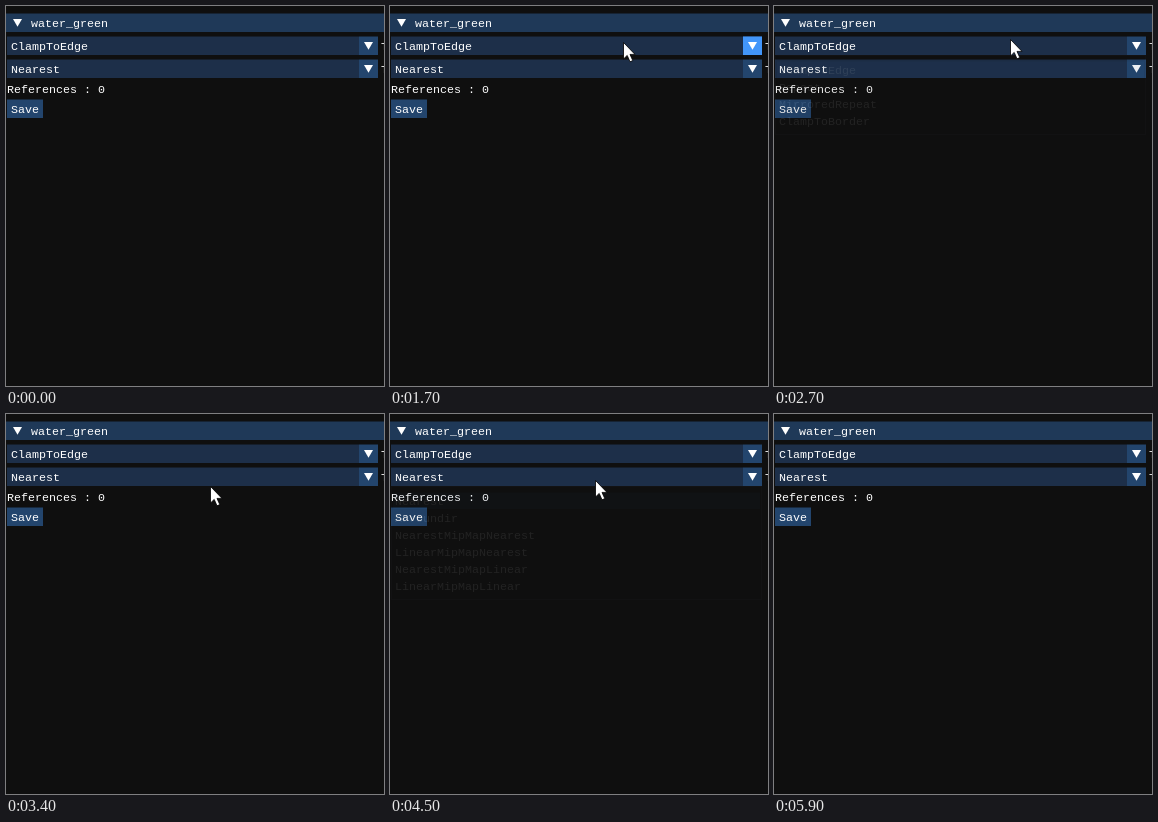
Write an HTML page that moves like this. It is 378 px wide and 380 px high and loops after 6.7 s.

```html
<!DOCTYPE html>
<html lang="en">
<head>
<meta charset="utf-8">
<title>Texture settings panel</title>
<style>
  html, body { margin: 0; width: 100%; height: 100%; overflow: hidden; background: #0f0f0f; }
  svg { display: block; width: 378px; height: 380px; }
  text { font: 11.667px "Liberation Mono", monospace; fill: #fff; white-space: pre; }
  .header { fill: #1f3958; }
  .field { fill: #1d2f49; }
  .button { fill: #23456d; }
  .glyph { fill: #fff; }
  .popup { fill: #0f0f0f; stroke: #3c3c40; }

  .lit, .menu, #cursor { animation: 6700ms step-end infinite; }
  .lit { fill: #4296fa; opacity: 0; }
  #wrapLit { animation-name: wrap-lit; }
  #filterLit { animation-name: filter-lit; }
  #saveLit { animation-name: save-lit; }
  #wrapMenu { animation-name: wrap-menu; }
  #filterMenu { animation-name: filter-menu; }
  #cursor { animation-name: cursor; }

  @keyframes wrap-lit {
    0%, 40.29%, 100% { opacity: 0; }
    25.37% { opacity: 1; }
  }
  @keyframes filter-lit {
    0%, 67.16%, 100% { opacity: 0; }
    52.23% { opacity: 1; }
  }
  @keyframes save-lit {
    0%, 79.1%, 100% { opacity: 0; }
    73.13% { opacity: 1; }
  }
  @keyframes wrap-menu {
    0%, 43.28%, 100% { opacity: 0; }
    26.86% { opacity: .9; }
    28.35% { opacity: .96; }
    32.83% { opacity: 1; }
    40.29% { opacity: .08; }
    41.79% { opacity: .04; }
  }
  @keyframes filter-menu {
    0%, 73.13%, 100% { opacity: 0; }
    53.73% { opacity: .9; }
    55.22% { opacity: .98; }
    56.71% { opacity: 1; }
    67.16% { opacity: .08; }
    70.14% { opacity: .04; }
  }
  @keyframes cursor {
    0%, 83.58%, 100% { transform: translate(-40px, 0); }
    11.94% { transform: translate(221px, 90px); }
    13.43% { transform: translate(222px, 48px); }
    25.37% { transform: translate(233px, 36px); }
    26.86% { transform: translate(236px, 33px); }
    41.79% { transform: translate(232px, 40px); }
    43.28% { transform: translate(225px, 50px); }
    46.26% { transform: translate(217px, 60px); }
    47.76% { transform: translate(208px, 70px); }
    49.25% { transform: translate(204px, 72px); }
    52.23% { transform: translate(205px, 68px); }
    56.71% { transform: translate(205px, 66px); }
    68.65% { transform: translate(165px, 76px); }
    70.14% { transform: translate(105px, 90px); }
    71.64% { transform: translate(52px, 100px); }
    73.13% { transform: translate(24px, 104px); }
    77.61% { transform: translate(22px, 107px); }
    79.1% { transform: translate(18px, 116px); }
    80.59% { transform: translate(10px, 126px); }
    82.08% { transform: translate(1px, 136px); }
  }
</style>
</head>
<body>
<svg viewBox="0 0 378 380">
  <defs>
    <path id="down" class="glyph" d="M-4.5-3.9H4.5L0 3.9Z"/>
    <g id="combo">
      <rect class="field" width="352" height="18.5"/>
      <rect class="button" x="352" width="19" height="18.5"/>
    </g>
  </defs>

  <rect class="header" y="7.5" width="378" height="18.5"/>
  <use href="#down" x="11.5" y="16.8"/>
  <text x="25" y="21">water_green</text>

  <use href="#combo" x="1" y="30.5"/>
  <rect id="wrapLit" class="lit" x="353" y="30.5" width="19" height="18.5"/>
  <use href="#down" x="362.5" y="39.8"/>
  <text x="5" y="44">ClampToEdge</text>
  <text x="375" y="44">T</text>

  <use href="#combo" x="1" y="53.5"/>
  <rect id="filterLit" class="lit" x="353" y="53.5" width="19" height="18.5"/>
  <use href="#down" x="362.5" y="62.8"/>
  <text x="5" y="67">Nearest</text>
  <text x="375" y="67">T</text>

  <text x="1" y="87">References : 0</text>
  <rect class="button" x="1" y="93.5" width="36" height="18.5"/>
  <rect id="saveLit" class="lit" x="1" y="93.5" width="36" height="18.5"/>
  <text x="5" y="107">Save</text>

  <g id="wrapMenu" class="menu">
    <rect class="popup" x="1.5" y="49.5" width="370" height="79"/>
    <rect class="header" x="3" y="55.5" width="367" height="16.5"/>
    <text x="5" y="68">ClampToEdge</text>
    <text x="5" y="85">Repeat</text>
    <text x="5" y="102">MirroredRepeat</text>
    <text x="5" y="119">ClampToBorder</text>
  </g>

  <g id="filterMenu" class="menu">
    <rect class="popup" x="1.5" y="72.5" width="370" height="113"/>
    <rect class="header" x="3" y="78.5" width="367" height="16.5"/>
    <text x="5" y="91">Nearest</text>
    <text x="5" y="108">Arroundir</text>
    <text x="5" y="125">NearestMipMapNearest</text>
    <text x="5" y="142">LinearMipMapNearest</text>
    <text x="5" y="159">NearestMipMapLinear</text>
    <text x="5" y="176">LinearMipMapLinear</text>
  </g>

  <path id="cursor" d="M.5.5V17L4.2 13.4L7 19.8L9.8 18.6L7 12.4H12Z" fill="#fff" stroke="#000" stroke-width=".8"/>
</svg>
</body>
</html>
```
